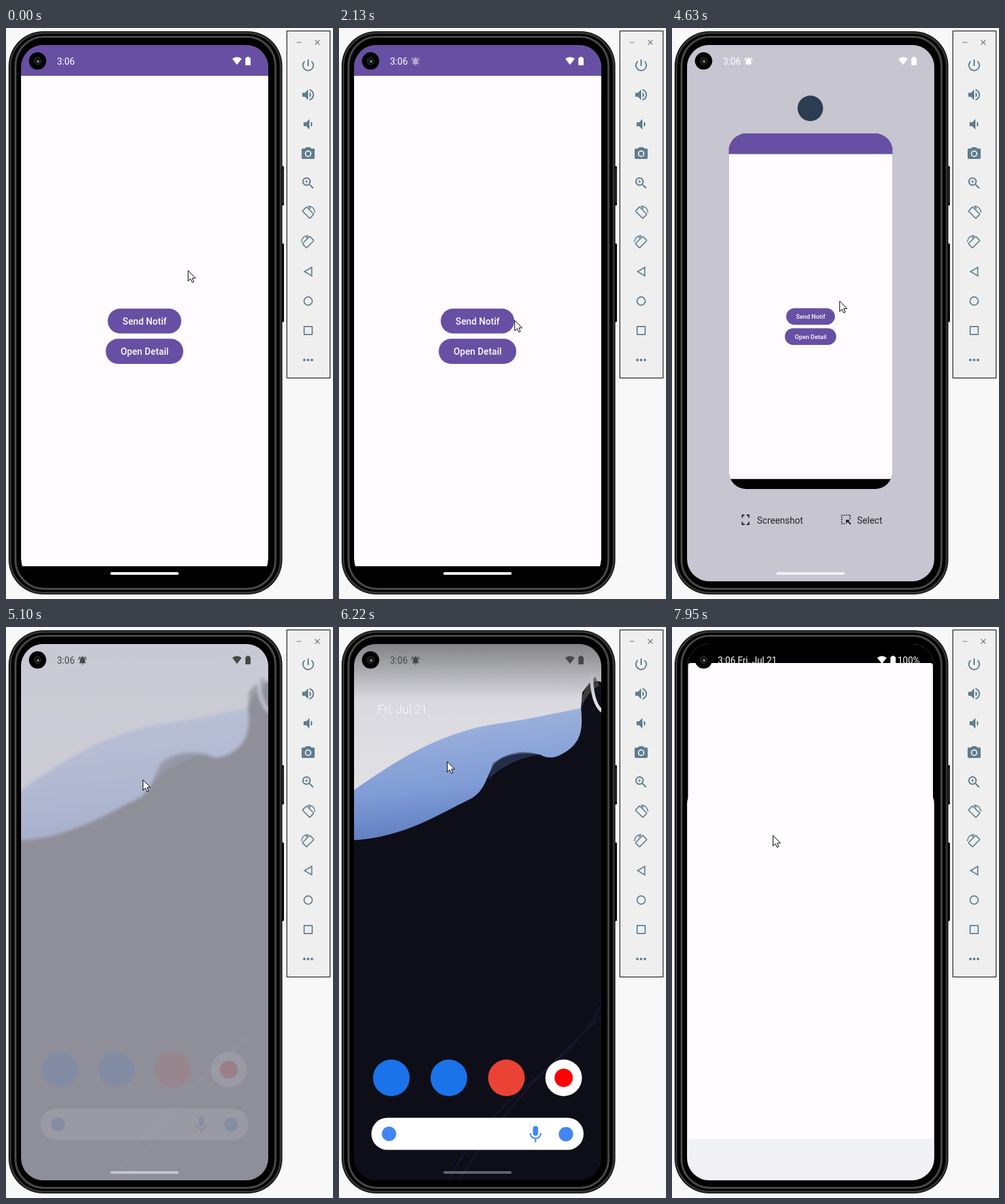
Write an HTML page that moves like this. It is 500 px wide and 872 px high and loops after 8000 ms.

```html
<!DOCTYPE html>
<html lang="en">
<head>
<meta charset="utf-8">
<title>Phone notification demo</title>
<style>
  html, body { margin: 0; width: 100%; height: 100%; overflow: hidden; background: #f8f8f8; }
  svg { display: block; width: 500px; height: 872px; font: 14px Roboto, Arial, sans-serif; }
  .label { font-weight: 500; letter-spacing: .1px; text-anchor: middle; fill: #fff; }
  .tools path { fill: #5f7d8e; }
  .tools .line { fill: none; stroke: #5f7d8e; stroke-width: 1.7; }
</style>
</head>
<body>
<svg viewBox="0 0 500 872" xmlns="http://www.w3.org/2000/svg">
  <defs>
    <clipPath id="screenClip"><rect x="23" y="26" width="378" height="819" rx="34"/></clipPath>
    <clipPath id="appClip"><rect id="appShape" x="23" y="26" width="378" height="819" rx="34"/></clipPath>
    <linearGradient id="sky" x2="0" y2="1">
      <stop offset="0" stop-color="#d2d3da"/><stop offset="1" stop-color="#e4e3e7"/>
    </linearGradient>
    <linearGradient id="blue" x1=".3" x2=".5" y2="1">
      <stop offset="0" stop-color="#a4b6dc"/><stop offset=".6" stop-color="#7f9cd6"/><stop offset="1" stop-color="#5b78bd"/>
    </linearGradient>
    <linearGradient id="shadow" x2="0" y2="1">
      <stop offset="0" stop-color="#333" stop-opacity=".5"/><stop offset="1" stop-color="#333" stop-opacity="0"/>
    </linearGradient>
    <path id="wifi" d="M-7.2-3.5Q0-9 7.2-3.5L0 5.8Z"/>
    <path id="battery" d="M-2-6.5h4v1.5h1.2q.8 0 .8.8v9.900q0 .8-.8.8h-6.400q-.8 0-.8-.8v-9.900q0-.8.8-.8h1.200z"/>
    <path id="bell" d="M7.580 4.080L6.150 2.650C3.750 4.480 2.170 7.300 2.030 10.500h2c.150-2.650 1.510-4.970 3.550-6.420zm12.390 6.420h2c-.150-3.200-1.730-6.020-4.120-7.850l-1.420 1.430c2.020 1.450 3.390 3.770 3.540 6.420zM18 11c0-3.070-1.640-5.640-4.500-6.320V4a1.500 1.500 0 0 0-3 0v.680C7.630 5.360 6 7.920 6 11v5l-2 2v1h16v-1l-2-2zm-6 11a2 2 0 0 0 2-2h-4a2 2 0 0 0 2 2z"/>
  </defs>

  <!-- Phone body -->
  <rect x="420" y="211" width="5" height="60" rx="1.500"/>
  <path d="M423.500 215v52" stroke="#555"/>
  <rect x="420" y="329" width="5" height="120" rx="1.500"/>
  <rect x="4" y="5" width="418.500" height="860" rx="53"/>
  <rect x="6.500" y="7.500" width="413.500" height="855" rx="51" fill="none" stroke="#343533" stroke-width="3"/>
  <rect x="14.500" y="13.500" width="397.500" height="843" rx="44" fill="none" stroke="#484947" stroke-width="3"/>
  <rect x="17" y="15" width="392" height="839" rx="41"/>

  <g clip-path="url(#screenClip)">
    <!-- Wallpaper -->
    <g id="wall">
      <path d="M0 0h430v880H0z" fill="#0e0e18"/>
      <path d="M0 0H425V90L401 84Q386 78 372 100L370 126 230 165 23 310H0Z" fill="url(#sky)"/>
      <path d="M0 262L23 249C90 202 150 165 228 150L290 140 370 124C373 153 371 172 352 187C337 198 322 204 308 195C285 190 247 193 235 213C224 233 222 253 198 264C150 287 90 328 0 326Z" fill="url(#blue)"/>
      <path d="M235 208Q270 182 306 195Q260 202 228 233Z" fill="#334267" opacity=".6"/>
      <path d="M370 124Q370 94 392 76L398 90Q380 98 370 124Z" fill="#55524f" opacity=".7"/>
      <path d="M386 70Q386 118 404 130" fill="none" stroke="#dddde2" stroke-width="5"/>
      <path d="M165 850Q205 765 300 690T405 560M180 850Q250 740 320 672T405 590" fill="none" stroke="#20204c" stroke-width="2" opacity=".5"/>
    </g>
    <rect id="shadowTop" x="23" y="26" width="378" height="85" fill="url(#shadow)"/>
    <rect id="scrim" x="23" y="26" width="378" height="819" fill="#c6c5d0"/>

    <!-- Home screen -->
    <text id="date" x="59" y="132" font-size="18" font-weight="300" fill="#fff">Fri, Jul 21</text>
    <g id="dock">
      <circle cx="80" cy="688.500" r="28" fill="#1a73e8"/>
      <circle cx="168" cy="688.500" r="28" fill="#1a73e8"/>
      <circle cx="256" cy="688.500" r="28" fill="#ea4335"/>
      <circle cx="343.500" cy="688.500" r="28" fill="#fff"/>
      <circle cx="343.500" cy="688.500" r="14" fill="#f00"/>
      <rect x="49.500" y="749.500" width="324.500" height="49" rx="24.500" fill="#fff"/>
      <circle cx="76.500" cy="774" r="11" fill="#4285f4"/>
      <rect x="296.500" y="762" width="8" height="15" rx="4" fill="#4285f4"/>
      <path d="M292.500 773a8 8 0 0 0 16 0M300.500 781v6" fill="none" stroke="#4285f4" stroke-width="2.200"/>
      <circle cx="347" cy="774.500" r="11" fill="#4285f4"/>
    </g>

    <!-- Recent apps -->
    <g id="actions" fill="#24242a">
      <text x="130" y="756.500">Screenshot</text>
      <text x="283" y="756.500">Select</text>
      <path d="M107.500 748v-4h3M114 744h3.500v4M117.500 754v4h-3.500M111 758h-3.500v-4" fill="none" stroke="#24242a" stroke-width="1.800"/>
      <path d="M272.500 750v-6h-13v13h6" fill="none" stroke="#24242a" stroke-width="1.700" stroke-dasharray="2 1.500"/>
      <path d="M266 751h6l-2 2 4 4-1.500 1.500-4-4-2.500 2.500z"/>
    </g>
    <circle id="appIcon" cx="211.500" cy="123.500" r="19.500" fill="#2b3d50"/>

    <!-- App window -->
    <g id="app"><g clip-path="url(#appClip)">
      <path d="M23 26h378v819H23z"/>
      <path d="M23 73h378v749H23z" fill="#fffbfe"/>
      <path d="M23 26h378v47H23z" fill="#6750a4"/>
      <rect x="155.500" y="428.500" width="112.500" height="38" rx="19" fill="#6750a4"/>
      <rect id="hover" x="155.500" y="428.500" width="112.500" height="38" rx="19" fill="#fff"/>
      <text class="label" x="212" y="452.700">Send Notif</text>
      <rect x="152.500" y="474.500" width="118.500" height="38.500" rx="19" fill="#6750a4"/>
      <text class="label" x="212" y="499">Open Detail</text>
      <rect id="appPill" x="159.500" y="831" width="104.500" height="4" rx="2" fill="#fff"/>
    </g></g>

    <rect id="pill" x="159.500" y="831" width="104.500" height="4" rx="2" fill="#fff"/>

    <!-- Notification shade -->
    <rect id="dark" x="23" y="26" width="378" height="819"/>
    <g id="shade">
      <g fill="#303036">
        <rect x="39" y="86" width="168" height="64" rx="24"/><rect x="217" y="86" width="168" height="64" rx="24"/>
        <rect x="39" y="160" width="168" height="64" rx="24"/><rect x="217" y="160" width="168" height="64" rx="24"/>
      </g>
      <rect x="23" y="244" width="378" height="920" rx="26" fill="#f1f0f4"/>
      <rect x="38" y="269" width="348" height="74" rx="24" fill="#fffbfe"/>
      <rect id="press" x="38" y="269" width="348" height="74" rx="24" fill="#6750a4"/>
    </g>

    <g id="status">
      <text x="78" y="56">3:06</text>
      <use id="alert" href="#bell" transform="translate(109.200 43) scale(.65)"/>
      <use href="#wifi" x="353.200" y="50.500"/>
      <use href="#battery" x="370" y="50.500"/>
    </g>
    <g id="header" fill="#fff">
      <text x="70" y="56">3:06 Fri, Jul 21</text>
      <use href="#wifi" x="321" y="50.500"/>
      <use href="#battery" x="338" y="50.500"/>
      <text x="345" y="56">100%</text>
    </g>
    <rect id="launch" x="24.500" y="55" width="374.500" height="727" rx="4" fill="#fffbfe"/>
  </g>

  <circle cx="48.300" cy="50.300" r="13.200"/>
  <circle cx="48.300" cy="50.300" r="5.500" fill="#161818" stroke="#2b2d2c"/>
  <circle cx="49" cy="51" r="1.500" fill="#b5b8b2"/>

  <!-- Emulator toolbar -->
  <rect x="429.500" y="4.500" width="66" height="530" fill="#efefef" stroke="#000"/>
  <rect id="toolHover" x="437" y="446" width="45" height="34" fill="#dfe5e8"/>
  <path d="M444.500 22h7M472.500 18.500l7 7M479.500 18.500l-7 7" stroke="#73797d" stroke-width="1.200"/>
  <g class="tools">
    <path transform="translate(450 45)" d="M13 3h-2v10h2zm4.830 2.170l-1.420 1.420A6.920 6.920 0 0 1 19 12a7 7 0 1 1-11.420-5.420L6.170 5.170A8.930 8.930 0 0 0 3 12a9 9 0 0 0 18 0c0-2.740-1.230-5.180-3.170-6.830z"/>
    <path transform="translate(450 90)" d="M3 9v6h4l5 5V4L7 9zm13.500 3c0-1.770-1.020-3.290-2.500-4.030v8.050c1.480-.730 2.500-2.250 2.500-4.020zM14 3.230v2.060c2.890.860 5 3.540 5 6.710s-2.110 5.850-5 6.710v2.060c4.010-.910 7-4.490 7-8.770s-2.990-7.860-7-8.770z"/>
    <path transform="translate(450 135)" d="M18.500 12c0-1.770-1.020-3.290-2.500-4.030v8.050c1.480-.730 2.500-2.250 2.500-4.020zM5 9v6h4l5 5V4L9 9z"/>
    <path transform="translate(450 180)" d="M9 2L7.170 4H4a2 2 0 0 0-2 2v12a2 2 0 0 0 2 2h16a2 2 0 0 0 2-2V6a2 2 0 0 0-2-2h-3.170L15 2zm3 15a5 5 0 1 1 0-10 5 5 0 0 1 0 10zm0-8.200a3.200 3.200 0 1 0 0 6.400 3.200 3.200 0 0 0 0-6.400z"/>
    <path transform="translate(450 225)" d="M15.500 14h-.790l-.280-.270A6.500 6.500 0 1 0 13.730 14.430l.270.280v.790l5 4.990L20.490 19zm-6 0a4.500 4.500 0 1 1 0-9 4.500 4.500 0 0 1 0 9zM12 10h-2v2H9v-2H7V9h2V7h1v2h2z"/>
    <g id="rotate" transform="translate(462 282)">
      <rect class="line" x="-4.500" y="-8" width="9" height="16" rx="1" transform="rotate(-45)"/>
      <path class="line" style="stroke-width:1.500" d="M0-10Q9.500-9.500 10.500 0M3.500-6L0-10"/>
    </g>
    <use href="#rotate" transform="translate(924 45) scale(-1 1)"/>
    <path class="line" d="M467.500 365.500v13l-11-6.500z"/>
    <circle class="line" cx="462" cy="417" r="6.300"/>
    <rect class="line" x="455.800" y="455.800" width="12.400" height="12.400" rx=".5"/>
    <path d="M454.200 507a2 2 0 1 0 4 0 2 2 0 1 0-4 0M460 507a2 2 0 1 0 4 0 2 2 0 1 0-4 0M465.800 507a2 2 0 1 0 4 0 2 2 0 1 0-4 0"/>
  </g>

  <path id="cursor" d="M.5.500V16.500L4.200 13 6.700 18.500 9.200 17.400 6.800 12H11.800Z" fill="#fff" stroke="#000"/>
</svg>

<script>
const LOOP = 8000;
const el = {};
document.querySelectorAll("[id]").forEach(node => el[node.id] = node);

// Piecewise linear value from pairs of time and value.
function at(t, ...keys) {
  if (t <= keys[0]) return keys[1];
  for (let i = 2; i < keys.length; i += 2) {
    if (t < keys[i]) {
      const f = (t - keys[i - 2]) / (keys[i] - keys[i - 2]);
      return keys[i - 1] + f * (keys[i + 1] - keys[i - 1]);
    }
  }
  return keys[keys.length - 1];
}
const set = (id, name, value) => el[id].setAttribute(name, value);
const fade = (id, value) => set(id, "opacity", value);
const between = (t, a, b) => +(t >= a && t < b);

const path = [
  [780, 278, 370], [1130, 262, 412], [1470, 246, 446], [1950, 246, 446], [2130, 268, 446],
  [2340, 304, 445], [2410, 316, 446], [2750, 400, 455], [3090, 451, 462], [3600, 451, 462],
  [3680, 429, 466], [4000, 330, 448], [4420, 256, 428], [4490, 256, 427], [4630, 256, 417],
  [4850, 228, 305], [5100, 209, 233], [5240, 205, 222], [5790, 199, 220], [5940, 194, 217],
  [6220, 165, 205], [6480, 165, 205], [6900, 160, 350], [7230, 157, 410], [7300, 157, 400],
  [7600, 154, 318]
];

function draw(t) {
  const x = at(t, ...path.flatMap(p => [p[0], p[1]]));
  const y = at(t, ...path.flatMap(p => [p[0], p[2]]));
  set("cursor", "transform", `translate(${x} ${y})`);
  fade("hover", at(t, 1330, 0, 1400, .08, 1600, .08, 1700, .2, 1900, .1, 2060, .08, 2120, 0));
  fade("toolHover", between(t, 2960, 3220));

  // Window shrinks to a card, which is then flicked away.
  const s = at(t, 3600, 1, 3620, .9, 3680, .79, 3760, .725, 3850, .682, 3960, .663);
  const lift = at(t, 4630, 0, 4700, -60, 4820, -260, 4960, -760);
  const cy = 435.5 - 6 * (1 - s) + lift;
  set("app", "transform", `translate(212 ${cy}) scale(${s}) translate(-212 -435.5)`);
  set("appShape", "rx", at(t, 3600, 34, 3620, 24, 3680, 21, 3960, 41));
  fade("appPill", at(t, 3760, 1, 3900, 0));
  set("appIcon", "transform", `translate(0 ${lift})`);
  fade("appIcon", at(t, 3850, 0, 4000, 1, 4750, 1, 4850, 0));
  fade("actions", at(t, 3900, 0, 4050, 1, 4640, 1, 4800, 0));

  fade("scrim", at(t, 3620, 0, 3680, .04, 4050, 1, 4960, 1, 5100, .71, 5240, .35, 5500, 0));
  el.wall.style.filter = `blur(${at(t, 3620, 3, 3680, 4, 4960, 4, 5100, 2.5, 5500, .6)}px)`;
  fade("shadowTop", at(t, 5100, 0, 5500, 1));
  const home = at(t, 5060, 0, 5100, .1, 5240, .5, 5450, 1);
  fade("dock", home);
  const rise = at(t, 5100, 1, 5240, .55, 5500, .15, 5790, 0);
  const scale = 1 - .022 * rise;
  set("dock", "transform", `translate(${212 * (1 - scale)} ${2.500 * rise}) scale(${scale})`);
  fade("date", at(t, 5240, 0, 5600, .9));
  fade("pill", at(t, 3850, 0, 4000, .75, 4960, .75, 5100, .5, 5400, .35));

  const open = at(t, 6480, 0, 6600, .2, 6750, .55, 6950, .9, 7160, 1);
  fade("dark", Math.min(1, open * 1.2));
  fade("shade", Math.min(1, open * 1.5));
  set("shade", "transform", `translate(0 ${-220 * (1 - open)})`);
  fade("press", at(t, 7480, 0, 7560, .1, 7630, .06));
  fade("header", at(open, .4, 0, .8, 1));
  fade("status", at(open, 0, 1, .4, 0));
  const tone = at(t, 4900, 255, 5040, 72);
  set("status", "fill", `rgb(${tone},${tone},${tone})`);
  fade("alert", at(t, 2060, 0, 2130, .5, 2340, 1));
  fade("launch", between(t, 7950, LOOP));
}

function frame() {
  draw(performance.now() % LOOP);
  requestAnimationFrame(frame);
}
frame();
</script>
</body>
</html>
```
